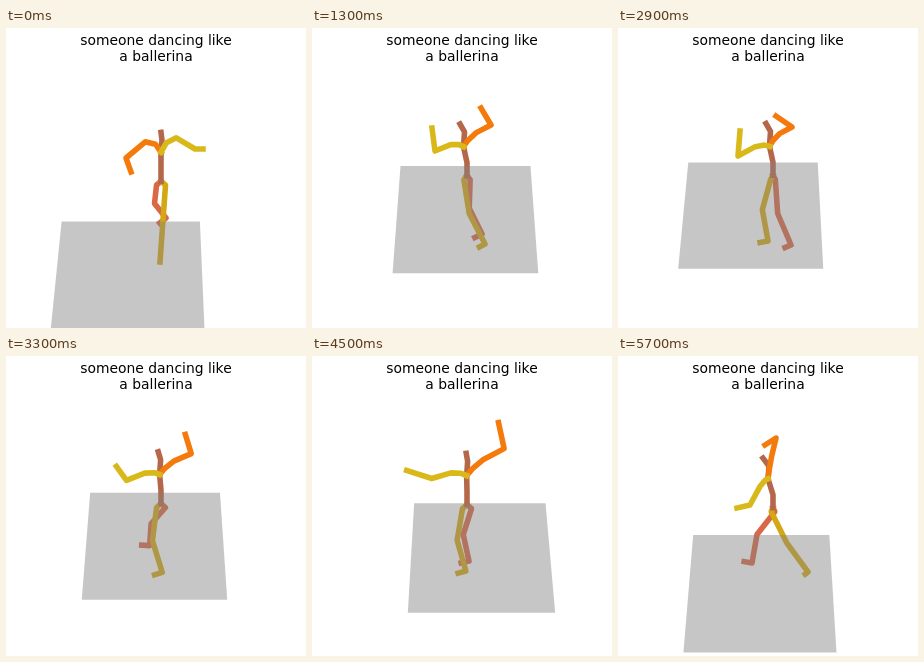
Animation, 300 px wide and 300 px high, one loop 5900 ms. Source, as an HTML page:

```html
<!DOCTYPE html>
<html lang="en">
<head>
<meta charset="utf-8">
<title>Stick figure dance</title>
<style>
  html, body { margin: 0; width: 100%; height: 100%; overflow: hidden; background: #fff; }
  svg { display: block; width: 100%; height: 100%; }
  text { font: 13.89px "DejaVu Sans", sans-serif; text-anchor: middle; }
  polyline { fill: none; stroke-width: 5.56; stroke-linecap: square; stroke-linejoin: round; }
</style>
</head>
<body>
<svg viewBox="0 0 300 300">
  <g id="body"></g>
  <polygon id="floor" fill="#808080" fill-opacity=".45"/>
  <text x="150" y="17">someone dancing like</text>
  <text x="150" y="33">a ballerina</text>
</svg>
<script>
const LOOP = 5900, STEP = 200;

// Key poses: step, middle of the floor's back edge, head x,
// elbow and hand of each arm, ankle of each leg. All else follows by rule.
const poses = [
  { at: 0, floor: [124.75, 193.5], head: [155], armR: [120,130, 125,144], armL: [189,121, 197,121], legR: [160,190], legL: [154,234] },
  { at: 7, floor: [153.5, 138], head: [148], armR: [179,97, 169,80], armL: [123,123, 120,100], legR: [170,206], legL: [173,216] },
  { at: 11, floor: [147.5, 131.5], head: [150], armR: [167,92, 149,73], armL: [130,124, 128,100], legR: [149,211], legL: [166,214] },
  { at: 15, floor: [135, 134.5], head: [148], armR: [174,99, 158,88], armL: [120,128, 122,103], legR: [173,217], legL: [150,213] },
  { at: 19, floor: [163.75, 140], head: [156], armR: [194,95, 196,68], armL: [122,121, 100,117], legR: [119,169], legL: [163,219] },
  { at: 26, floor: [164, 156], head: [151], armR: [184,90, 171,71], armL: [120,128, 97,117], legR: [183,233], legL: [152,212] },
  { at: 29, floor: [143.25, 179], head: [145], armR: [158,82, 147,89], armL: [132,149, 119,152], legR: [134,207], legL: [190,216] }
];

const clamp = (v, lo, hi) => Math.min(Math.max(v, lo), hi);
const mix = (p, q, u) => [p[0] + (q[0] - p[0]) * u, p[1] + (q[1] - p[1]) * u];

// Smooth curve through the poses, with slopes taken from the neighbouring keys.
function sample(part, n) {
  const last = poses.length - 1;
  let k = 0;
  while (k < last - 1 && n >= poses[k + 1].at) k++;
  const from = poses[k], to = poses[k + 1];
  const span = to.at - from.at, u = (n - from.at) / span;
  const slope = (j, i) => {
    const a = poses[Math.max(j - 1, 0)], b = poses[Math.min(j + 1, last)];
    return (b[part][i] - a[part][i]) / (b.at - a.at);
  };
  return from[part].map((p, i) =>
    p + (to[part][i] - p) * u * u * (3 - 2 * u)
      + span * u * (1 - u) * ((1 - u) * slope(k, i) - u * slope(k + 1, i)));
}

// The collar and shoulder arch above the straight line from chest to elbow.
function arm(chest, [ex, ey, hx, hy], raise) {
  const shoulder = mix(chest, [ex, ey], 0.45);
  shoulder[1] -= raise;
  const collar = mix(chest, shoulder, 0.35);
  collar[1] -= raise / 3;
  return [chest, collar, shoulder, [ex, ey], [hx, hy]];
}

// The knee bows sideways and the foot stands square to the shin;
// both straighten out as the leg reaches its full length.
function leg(root, hipShift, ankle) {
  const hip = [root[0] + hipShift, root[1] + 4];
  const dx = ankle[0] - hip[0], dy = ankle[1] - hip[1], reach = Math.hypot(dx, dy);
  const bend = clamp((74 - reach) / 8, 0, 1);
  const knee = mix(hip, ankle, 0.5);
  knee[0] -= dy / reach * 7 * bend;
  knee[1] += dx / reach * 7 * bend;
  const sx = ankle[0] - knee[0], sy = ankle[1] - knee[1], toe = 8 * bend / Math.hypot(sx, sy);
  return [root, hip, knee, ankle, [ankle[0] - sy * toe, ankle[1] + sx * toe]];
}

// A square seen in perspective: it grows as it comes nearer (lower).
function floorCorners(x, y) {
  const near = y - 131.5;
  const back = (129 + near * 0.15) / 2, front = (144.5 + near * 0.18) / 2;
  const frontX = x + (x - 154) * 0.12, frontY = y + 105.5 + near * 0.25;
  return [[x - back, y], [x + back, y], [frontX + front, frontY], [frontX - front, frontY]];
}

const bodyGroup = document.getElementById("body");
const floorShape = document.getElementById("floor");

// Right leg, left leg, spine, right arm, left arm.
const lines = ["#da6746", "#d4a814", "#b5674a", "#f47a0c", "#d9b91a"].map(color => {
  const line = document.createElementNS("http://www.w3.org/2000/svg", "polyline");
  line.setAttribute("stroke", color);
  return bodyGroup.appendChild(line);
});

function draw(n) {
  const at = part => sample(part, n);
  const [floorX, floorY] = at("floor"), [headX] = at("head");
  const armR = at("armR"), armL = at("armL");

  const near = floorY - 131.5;
  const root = [155, 147 + near * 0.1];
  const head = [headX, 95 + near * 0.15];
  const chest = [(155 + headX) / 2, root[1] - 29];
  const neck = [chest[0] + 1, head[1] + 8];
  const turn = clamp((armR[2] - armL[2]) / 70, -1, 1); // below 0 when seen from behind
  const raise = 4 - 9 * Math.min(turn, 0);

  const limbs = [
    leg(root, 4.5 * turn, at("legR")),
    leg(root, -4.5 * turn, at("legL")),
    [root, [155, root[1] - 13], chest, neck, head],
    arm(chest, armR, raise),
    arm(chest, armL, raise)
  ];
  limbs.forEach((points, i) => lines[i].setAttribute("points", points.join(" ")));
  floorShape.setAttribute("points", floorCorners(floorX, floorY).join(" "));
}

const begin = performance.now();
function tick() {
  const t = (performance.now() - begin) % LOOP;
  draw(Math.floor((t + STEP / 2) / STEP)); // the first pose lasts half a step
  requestAnimationFrame(tick);
}
tick();
</script>
</body>
</html>
```
